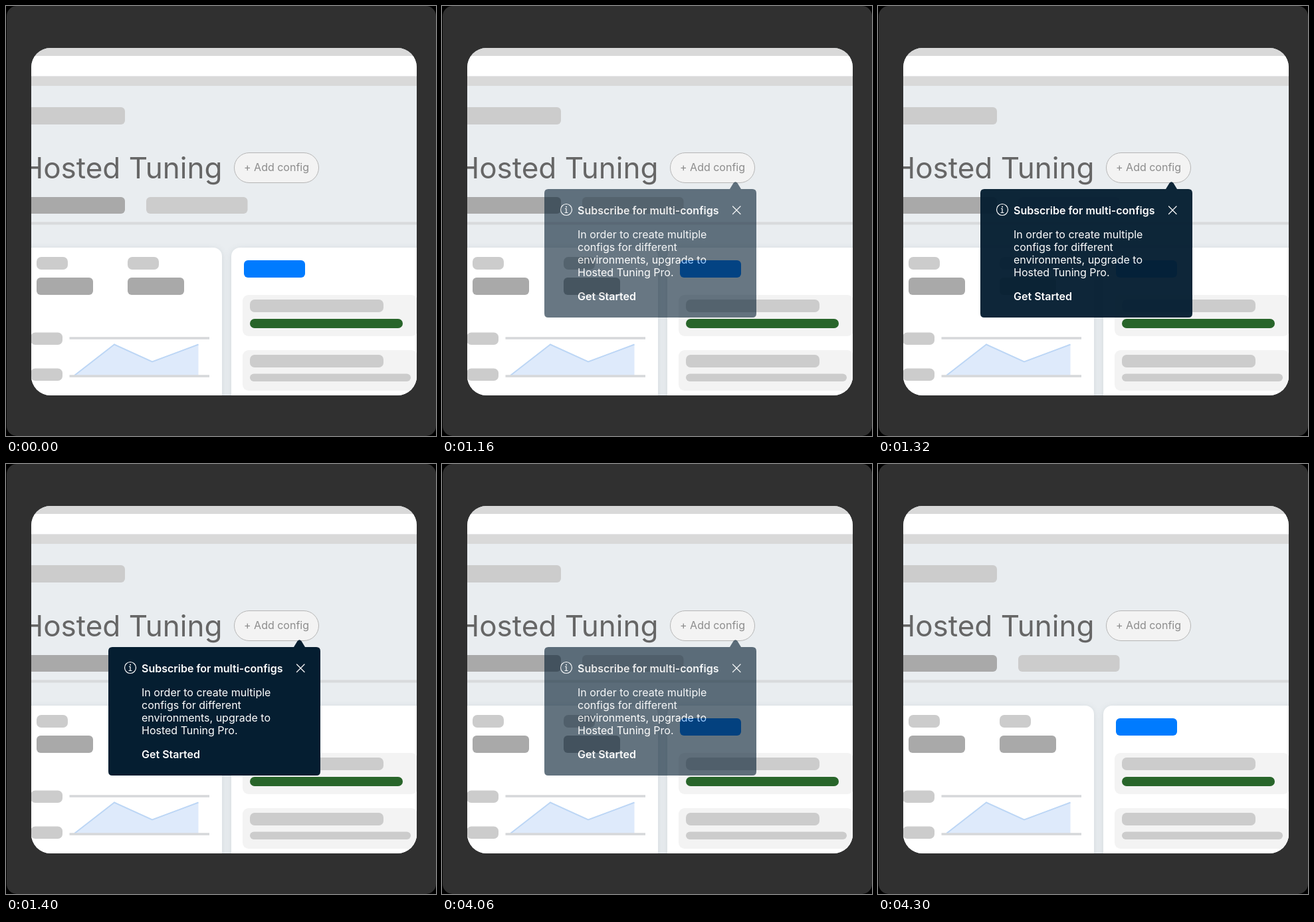
Recreate the animation shown at these times as an HTML page. Size 647 by 646 pixels, loop 4.63 s.

```html
<!DOCTYPE html>
<html lang="en">
<head>
<meta charset="utf-8">
<title>Config upgrade tooltip</title>
<style>
  html, body { margin: 0; width: 100%; height: 100%; overflow: hidden; background: #000; }
  svg { display: block; width: 647px; height: 646px; font: 16px Inter, sans-serif; }
  .light { fill: #ccc; }
  .dark { fill: #a9a9a9; }
  .band { fill: #d9d9d9; }
  .card { fill: #fff; filter: drop-shadow(0 2px 5px rgba(50, 70, 80, .13)); }
  .item { fill: #f3f3f3; }
  #tip { fill: #fff; }
  #tip .panel { fill: #051e31; }
  #tip .icon { fill: none; stroke: #fff; stroke-width: 1.2; stroke-linecap: round; }
  .strong { font-weight: 600; }
</style>
</head>
<body>
<svg viewBox="0 0 647 646">
  <defs>
    <clipPath id="screen"><rect x="38" y="63" width="580" height="522" rx="29"/></clipPath>
  </defs>
  <rect x="1" width="646" height="646" rx="15" fill="#303030"/>

  <g clip-path="url(#screen)">
    <rect x="38" y="63" width="580" height="522" fill="#e9edf0"/>
    <rect class="band" x="38" y="63" width="580" height="12"/>
    <rect x="38" y="75" width="580" height="30.5" fill="#fff"/>
    <rect class="band" x="38" y="105.5" width="580" height="14.5"/>

    <rect class="light" x="20" y="152" width="159" height="26" rx="6"/>
    <text x="325.5" y="259" font-size="44" text-anchor="end" fill="#666">Hosted Tuning</text>
    <rect x="343.5" y="220.5" width="127" height="45" rx="22.5" fill="#f3f3f3" stroke="#b5b5b5"/>
    <text x="358" y="248" fill="#8c8c8c">+ Add config</text>
    <rect class="dark" x="20" y="287" width="159" height="25" rx="6"/>
    <rect class="light" x="211" y="287" width="152.5" height="25" rx="6"/>
    <rect x="38" y="324.5" width="580" height="4" fill="#d8dadc"/>

    <rect class="card" x="10" y="363" width="315" height="260" rx="13"/>
    <rect class="light" x="46" y="377" width="47" height="19" rx="7"/>
    <rect class="light" x="183" y="377" width="47" height="19" rx="7"/>
    <rect class="dark" x="46" y="408" width="85" height="26" rx="6"/>
    <rect class="dark" x="183" y="408" width="85" height="26" rx="6"/>
    <rect class="light" x="37" y="490.5" width="48" height="18.5" rx="7"/>
    <rect class="light" x="37" y="544.5" width="48" height="18.5" rx="7"/>
    <path d="M103 555L163 508.5L220 534.5L289.5 508.5V555Z" fill="#deeafb"/>
    <path d="M103 555L163 508.5L220 534.5L289.5 508.5" fill="none" stroke="#bcd6f5" stroke-width="2"/>
    <path d="M95.5 499H306M95.5 556H306" stroke="#d6d8da" stroke-width="3.5"/>

    <rect class="card" x="339" y="363" width="320" height="260" rx="13"/>
    <rect x="358" y="382" width="92" height="26" rx="6" fill="#007bff"/>
    <rect class="item" x="356" y="434" width="263" height="62" rx="9"/>
    <rect class="light" x="367" y="441" width="201" height="19" rx="7"/>
    <rect x="367" y="470" width="230" height="14" rx="7" fill="#28652a"/>
    <rect class="item" x="356" y="517" width="263" height="61" rx="9"/>
    <rect class="light" x="367" y="524" width="201" height="19" rx="7"/>
    <rect class="light" x="367" y="552.5" width="242" height="11.5" rx="5.75"/>
  </g>

  <g id="tip" opacity="0">
    <path class="panel" d="M160 275H433L438.5 266Q441.5 262.5 444.5 266L450 275H467Q473 275 473 281V462Q473 468 467 468H160Q154 468 154 462V281Q154 275 160 275Z"/>
    <circle class="icon" cx="187" cy="306" r="8.5"/>
    <path class="icon" d="M185.5 304.5H187V310.5M185 310.5H189M437.5 301L449 312.5M449 301L437.5 312.5"/>
    <circle cx="187" cy="301.7" r="1"/>
    <text class="strong" x="204" y="313">Subscribe for multi-configs</text>
    <text y="349">
      <tspan x="204">In order to create multiple</tspan>
      <tspan x="204" dy="19">configs for different</tspan>
      <tspan x="204" dy="19">environments, upgrade to</tspan>
      <tspan x="204" dy="19">Hosted Tuning Pro.</tspan>
    </text>
    <text class="strong" x="204" y="442">Get Started</text>
  </g>
</svg>
<script>
  const LOOP = 4630, STEP = 80, SHOW = 1080, HIDE = 3980;
  const fadeIn = [.28, .6, .85, .96, 1];
  const fadeOut = [.94, .62, .22, .06, 0];
  const tip = document.getElementById("tip");
  const start = performance.now();

  const levelAt = (levels, elapsed) =>
    levels[Math.min(levels.length - 1, Math.floor(elapsed / STEP))];

  function opacityAt(time) {
    if (time < SHOW) return 0;
    return time < HIDE ? levelAt(fadeIn, time - SHOW) : levelAt(fadeOut, time - HIDE);
  }

  function draw() {
    const time = Math.max(0, performance.now() - start) % LOOP;
    tip.setAttribute("opacity", opacityAt(time));
    requestAnimationFrame(draw);
  }
  draw();
</script>
</body>
</html>
```
